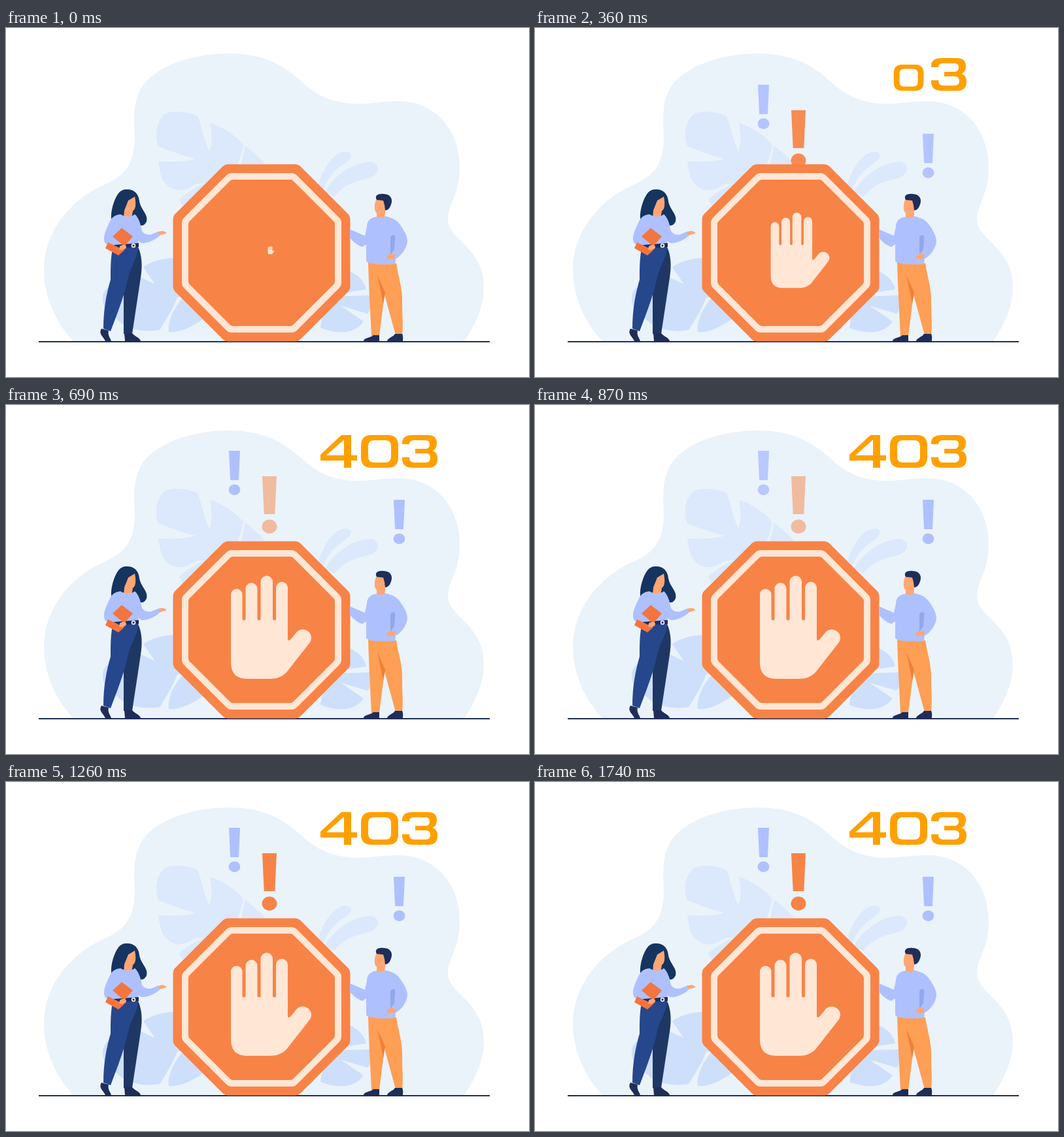
Write an HTML page with a canvas that moves like this. It is 800x534 px and loops after 1.8 s.

```html
<!DOCTYPE html>
<html lang="en">
<head>
<meta charset="utf-8">
<title>403</title>
<style>
html, body { margin: 0; width: 100%; height: 100%; overflow: hidden; background: #fff; }
canvas { display: block; }
</style>
</head>
<body>
<canvas id="stage" width="800" height="534" role="img" aria-label="403"></canvas>
<script>
const ctx = document.getElementById('stage').getContext('2d');
const LOOP = 1800, STEP = 30;

const ORANGE = '#f88347', CREAM = '#ffe6d5', AMBER = '#ffa000', LILAC = '#afc0ff';
const SKIN = '#ffa673', NAVY = '#1f2d59', HAIR = '#15345f', PALE = '#dce8fb', LEAF = '#cddffb';

const clamp = v => Math.max(0, Math.min(1, v));
const quart = p => {
  p = clamp(p);
  return p < 0.5 ? 8 * p ** 4 : 1 - 8 * (1 - p) ** 4;
};
// Opacity of a blink that is darkest at mid
const blink = (t, mid) => clamp(Math.abs(t - mid) / 180);

function fill(color, d, rule = 'nonzero') {
  ctx.fillStyle = color;
  ctx.fill(new Path2D(d), rule);
}

function octagon(color, apothem, round) {
  const cx = 391, cy = 344, r = apothem / Math.cos(Math.PI / 8);
  const pt = i => {
    const a = (i + 0.5) * Math.PI / 4;
    return [cx + r * Math.cos(a), cy + r * Math.sin(a)];
  };
  ctx.beginPath();
  ctx.moveTo(cx + apothem, cy);
  for (let i = 0; i < 8; i++) ctx.arcTo(...pt(i), ...pt(i + 1), round);
  ctx.closePath();
  ctx.fillStyle = color;
  ctx.fill();
}

function scaled(x, y, s, draw) {
  if (s <= 0) return;
  ctx.save();
  ctx.translate(x, y);
  ctx.scale(s, s);
  ctx.translate(-x, -y);
  draw();
  ctx.restore();
}

function backdrop() {
  fill('#eaf3fa', `M104 480C75 450 58 410 58 369C59 310 100 262 150 240C185 225 197 205 197 165
    C195 130 196 108 210 87C235 55 290 39 340 39C395 39 425 58 450 80C475 104 500 115 535 116
    C560 116 575 112 600 112C660 112 694 160 694 212C694 255 676 270 676 292
    C676 325 731 335 731 396C731 425 718 455 700 480Z`);
  fill(PALE, `M244 131C262 125 280 129 293 135C300 152 302 170 311 189C317 175 314 160 312 145
    C333 152 352 165 363 179C361 190 358 200 352 214L330 240L294 238C286 240 278 247 270 248
    C255 250 242 240 238 228C235 218 234 210 233 204C255 205 275 205 290 200
    C270 195 250 188 233 181C227 165 229 143 244 131Z`);
  fill(PALE, 'M366 180C378 190 388 198 396 208H360ZM265 262C280 250 295 240 312 236L270 272Z');
  fill(PALE, 'M476 245C485 215 500 190 520 189C532 190 529 200 518 207C500 218 488 235 484 252Z');
  fill(PALE, 'M488 250C505 222 535 204 560 205C573 209 571 222 560 228C540 235 522 234 502 258Z');
  fill(LEAF, `M160 395C147 400 145 415 152 430L165 440C175 455 200 468 235 462
    C250 450 257 432 270 414L256 400V352C240 352 220 358 210 366L228 392L203 380L180 390Z`);
  fill('#eaf3fa', 'M270 412L262 412C255 432 244 446 234 465H247C246 448 258 428 270 413Z');
  fill(LEAF, 'M270 414L302 445C285 457 265 467 249 465C246 447 260 427 270 414Z');
  fill(LEAF, `M520 370C535 375 548 385 551 400C530 403 510 406 498 411L556 409
    C560 425 556 435 553 437L512 425L547 449C535 467 510 470 481 459C482 450 485 440 484 430
    L476 440L470 458L455 470Z`);
}

function mark(color, x, y, k, alpha) {
  ctx.save();
  ctx.globalAlpha = alpha;
  ctx.translate(x, y);
  ctx.scale(k, k);
  fill(color, 'M-11 0H11L8.3 58H-8.3Z');
  ctx.beginPath();
  ctx.ellipse(0, 77, 11.5, 10.7, 0, 0, 7);
  ctx.fill();
  ctx.restore();
}

function sign() {
  octagon(ORANGE, 135.5, 12);
  octagon(CREAM, 122, 12);
  octagon(ORANGE, 112, 6);
}

function palm() {
  fill(CREAM, `M344 290a8.75 8.75 0 0 1 17.5 0V327a2.5 2.5 0 0 0 5 0V281a9 9 0 0 1 18 0V327
    a2.5 2.5 0 0 0 5 0V270.5a9.25 9.25 0 0 1 18.5 0V327a2.5 2.5 0 0 0 5 0V279.5a9 9 0 0 1 18 0
    V357Q431 363 436 358L445 347C456 337 473 350 465 363C452 380 440 395 430 408
    C423 416 414 419 403 419H369Q344 419 344 394Z`);
}

function woman() {
  fill(HAIR, `M184 247C195 246 203 253 204 265C206 278 218 285 215 296C213 300 210 303 206 302
    C195 296 185 292 180 288C172 292 165 296 161 292C160 280 165 262 172 253C176 248 180 247 184 247Z`);
  fill(SKIN, 'M187 264L197 258C199 268 199 277 194 280L192 291H180L181 279Z');
  fill('#1f3764', 'M202 335C208 348 209 364 206 382L193 468H180L180 400L184 365Z');
  fill('#27478c', `M164 333H202C203 350 191 363 187 382C181 410 169 440 160 464L149 460
    C149 430 154 405 160 385C160 365 160 350 164 333Z`);
  fill(NAVY, 'M146 460L157 463C155 470 160 475 161 479H152C149 472 141 468 146 460Z');
  fill(NAVY, 'M181 467H193C197 472 205 474 206 479H182Z');
  fill(LILAC, `M175 285C183 290 192 289 197 285C203 290 206 300 208 311C212 316 218 317 222 316
    L234 311L236 317C228 325 215 330 207 329L202 326L203 331L163 333L152 330
    C147 322 152 310 158 298C162 288 168 286 175 285Z`);
  fill(NAVY, 'M165 332L203 329L203 335L165 337Z');
  ctx.strokeStyle = '#fff';
  ctx.lineWidth = 1.5;
  ctx.beginPath();
  ctx.arc(195, 333, 2.5, 0, 7);
  ctx.stroke();
  fill(SKIN, 'M232 313C238 309 242 310 246 314L236 317Z');
  fill('#f6733c', 'M156 328L181 340L172 348L152 337Z');
  fill('#f3753f', 'M177 306L194 319L181 334L163 319Z');
  fill(SKIN, 'M174 334C178 331 184 331 184 335C184 339 177 341 173 339Z');
}

function man() {
  fill(SKIN, 'M566 263L578 262L581 273L579 292H567V283C563 281 563 270 566 263Z');
  fill(NAVY, `M567 263C563 256 570 253 578 254C589 254 592 263 589 270C587 276 584 279 580 279
    L579 271L577 264Z`);
  fill('#ff9e55', `M554 359L597 360C600 380 607 400 606 420C606 440 608 455 606 470H596L579 408
    L571 471H559C557 430 555 395 554 359Z`);
  fill('#f08038', 'M568 378L580 405L577 422Z');
  fill(NAVY, 'M562 470H571V479H547C547 474 558 474 562 470Z');
  fill(NAVY, 'M595 468H606C608 472 607 477 607 479H583C584 474 592 473 595 468Z');
  fill(LILAC, `M566 289C572 291 577 291 580 288C590 290 598 294 602 300C608 308 614 318 614 326
    C613 338 604 349 596 353L595 361C575 363 551 361 551 356V331L545 335
    C538 333 531 327 526 321V308L549 318L552 304C552 295 558 290 566 289Z`);
  fill('#91a8ee', 'M588 320C592 314 597 317 595 324L594 339L588 347Z');
  fill(SKIN, 'M582 350C586 345 592 345 596 347L594 353L585 354Z');
}

const digits = [
  [633, 0, `M606 60V58Q606 46 622 46H645Q659 46 659 58Q659 68 652 70Q660 72 660 82Q660 96 646 96
    H622Q606 96 606 82V80H617Q617 88 624 88H642Q649 88 649 81Q649 74 642 74H626V67H642
    Q648 67 648 60Q648 54 642 54H624Q617 54 617 60Z`],
  [572, 200, `M559 46H584Q600 46 600 62V80Q600 96 584 96H559Q543 96 543 80V62Q543 46 559 46Z
    M563 54Q554 54 554 63V79Q554 88 563 88H580Q589 88 589 79V63Q589 54 580 54Z`],
  [509, 400, 'M513 46H528V77H537V85H528V96H517V85H481V76ZM517 53L490 77H517Z']
];

function draw(t) {
  ctx.fillStyle = '#fff';
  ctx.fillRect(0, 0, 800, 534);
  backdrop();

  const drop = 91 * (1 - quart(t / 590));
  const show = clamp((t - 110) / 270);
  mark(LILAC, 349.5, 70 + drop, 0.775, show * blink(t, 1020));
  mark(LILAC, 601.5, 145 + drop, 0.775, show * blink(t, 1056));

  ctx.fillStyle = NAVY;
  ctx.fillRect(50, 479, 690, 2);
  sign();
  mark(ORANGE, 403, 109 + drop, 1, show * blink(t, 780));
  scaled(405.4, 340, 0.08 + 0.92 * quart(t / 640), palm);
  woman();
  man();

  for (const [x, start, d] of digits) {
    scaled(x, 96, clamp((t - start) / 200), () => fill(AMBER, d, 'evenodd'));
  }
}

const begin = performance.now();
function tick() {
  const t = (performance.now() - begin) % LOOP;
  draw(Math.floor(t / STEP) * STEP);
  requestAnimationFrame(tick);
}
tick();
</script>
</body>
</html>
```
